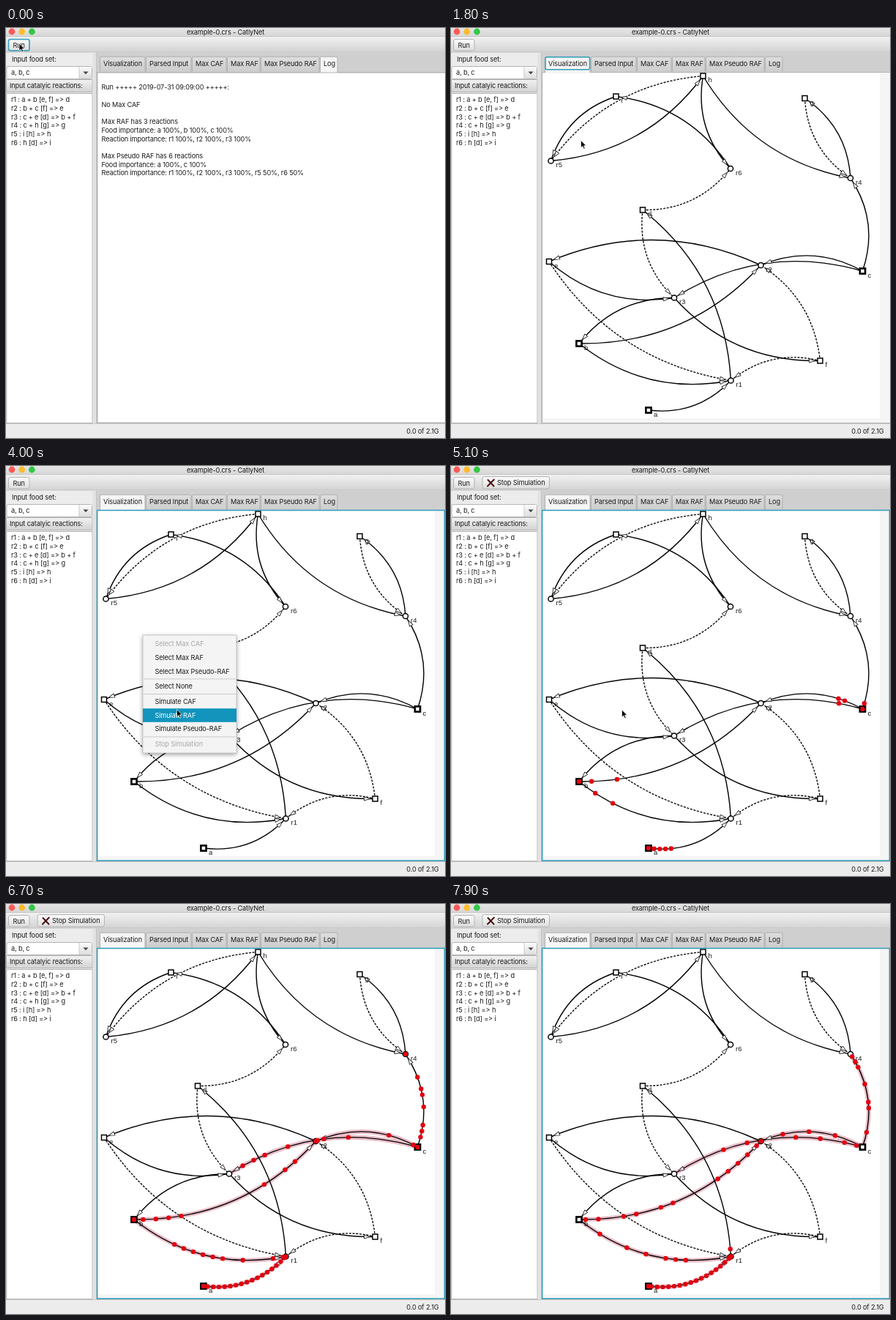
These frames come from a looping animation (600x560 px, 8 s). An HTML page:

```html
<!DOCTYPE html>
<html lang="en">
<head>
<meta charset="utf-8">
<title>Reaction network</title>
<style>
  html, body { margin: 0; width: 100%; height: 100%; overflow: hidden; background: #ececec; }
  svg { display: block; width: 600px; height: 560px; }
  text {
    font: 9.2px Inter, "Open Sans", sans-serif;
    letter-spacing: -.15px;
    font-feature-settings: "calt" 0, "liga" 0;
    fill: #1c1c1c;
    white-space: pre;
  }
  .node { font: 9.5px "Liberation Sans", Arial, sans-serif; letter-spacing: 0; }
  .edge { fill: none; stroke: #000; stroke-width: 1.4; }
  .dash { stroke-width: 1.35; stroke-dasharray: 3 1.7; }
  .glow { fill: none; stroke: #ebbfc9; stroke-width: 6; stroke-linecap: round; }
  .tip { fill: #fff; stroke: #222; stroke-width: .9; }
  .ring { fill: none; stroke: #2f9fbc; stroke-width: 1.5; }
  .off { fill: #a9a9a9; }
</style>
</head>
<body>
<svg id="stage" viewBox="0 0 600 560">
  <defs>
    <linearGradient id="title" x2="0" y2="1"><stop stop-color="#e6e6e6"/><stop offset="1" stop-color="#d6d6d6"/></linearGradient>
    <linearGradient id="bar" x2="0" y2="1"><stop stop-color="#f2f2f2"/><stop offset="1" stop-color="#d3d3d3"/></linearGradient>
    <linearGradient id="btn" x2="0" y2="1"><stop stop-color="#fbfbfb"/><stop offset="1" stop-color="#dedede"/></linearGradient>
    <linearGradient id="tab" x2="0" y2="1"><stop stop-color="#dedede"/><stop offset="1" stop-color="#cdcdcd"/></linearGradient>
    <filter id="shadow" x="-20%" y="-20%" width="140%" height="140%">
      <feDropShadow dx="0" dy="2" stdDeviation="3" flood-opacity=".4"/>
    </filter>
  </defs>
  <g id="chrome"></g>
  <g id="tabs"></g>
  <g id="log"></g>
  <g id="graph"></g>
  <rect id="paneRing" class="ring" x="124.6" y="60.5" width="474.8" height="478.5"/>
  <g id="menu"></g>
  <path id="cursor" d="M0 0V10L2.4 7.9L4 11.6L5.7 10.9L4.1 7.3H7.2Z" fill="#000" stroke="#fff" stroke-width=".7"/>
</svg>
<script>
const LOOP = 8000, FRAME = 100;
const $ = id => document.getElementById(id);
const rect = (x, y, w, h, fill, more = '') =>
  `<rect x="${x}" y="${y}" width="${w}" height="${h}" fill="${fill}" ${more}/>`;
const text = (x, y, s, more = '') =>
  `<text x="${x}" y="${y}" ${more}>${s.replace(/>/g, '&gt;')}</text>`;
const lines = (x, y, list) => list.map((s, i) => text(x, y + i * 11.7, s)).join('');
const show = (el, on) => { el.style.display = on ? '' : 'none'; };

// Window
const EDGE = 'stroke="#b4b4b4"';
$('chrome').innerHTML =
  rect(0, 0, 600, 560, '#ececec') +
  rect(0, 0, 600, 11.5, 'url(#title)') +
  ['#fc5b57', '#fdbc2e', '#33c748'].map((c, i) => `<circle cx="${8 + i * 13.7}" cy="5" r="4.4" fill="${c}"/>`).join('') +
  text(300, 8.5, 'example-0.crs - CatlyNet', 'text-anchor="middle"') +
  rect(0, 11.5, 600, 21.5, 'url(#bar)') +
  rect(0, 11, 600, .8, '#bdbdbd') + rect(0, 32.6, 600, .8, '#b8b8b8') +
  rect(3.5, 15.5, 28.5, 15.5, 'url(#btn)', EDGE + ' rx="2.5"') +
  '<rect id="runRing" class="ring" x="3.5" y="15.5" width="28.5" height="15.5" rx="2.5"/>' +
  text(9.5, 26.8, 'Run') +
  '<g id="stop">' + rect(43, 14.5, 91.5, 16.5, 'url(#btn)', EDGE + ' rx="2.5"') +
  '<path d="M50.5 19L58.5 27.5M58.8 18.5L50 27.5" stroke="#4a1014" stroke-width="2" stroke-linecap="round"/>' +
  text(63, 26.3, 'Stop Simulation') + '</g>' +
  text(8, 46, 'Input food set:') +
  rect(1, 52.5, 116.5, 17, '#fff', EDGE + ' rx="2"') +
  rect(100, 53, 17, 16, 'url(#btn)') + rect(99.6, 53, .8, 16, '#c0c0c0') +
  '<path d="M105.5 59.5h7l-3.5 3.8z" fill="#444"/>' +
  text(7, 64, 'a, b, c') +
  rect(.5, 70.5, 117.5, 17, 'url(#bar)', EDGE) +
  text(5, 81.8, 'Input catalyic reactions:') +
  rect(.8, 89.5, 117.2, 450, '#fff', EDGE) +
  lines(7, 101.3, ['r1 : a + b [e, f] => d', 'r2 : b + c [f] => e', 'r3 : c + e [d] => b + f',
    'r4 : c + h [g] => g', 'r5 : i [h] => h', 'r6 : h [d] => i']) +
  rect(118.6, 33.4, 5.4, 507, '#e2e2e2') + rect(123.4, 33.4, .9, 507, '#b0b0b0') +
  rect(124, 33.4, 476, 27, '#cfcfcf') +
  rect(124.5, 60.5, 477, 479, '#f5f5f5', EDGE) +
  rect(0, 540.2, 600, .8, '#bfbfbf') +
  text(591.5, 554.3, '0.0 of 2.1G', 'text-anchor="end"');

// Tabs: name, left, width
const TABS = [['Visualization', 128, 62], ['Parsed Input', 191, 62], ['Max CAF', 254, 47],
  ['Max RAF', 302, 45], ['Max Pseudo RAF', 348, 80], ['Log', 429, 24]];
function drawTabs(sel, focus) {
  $('tabs').innerHTML = TABS.map(([name, x, w], i) => {
    const on = i === sel;
    return `<path d="M${x + .5} ${on ? 61 : 59.5}V41q0-1.8 1.8-1.8H${x + w - 1.8}q1.8 0 1.8 1.8V${on ? 61 : 59.5}"` +
      ` fill="${on ? '#f5f5f5' : 'url(#tab)'}" stroke="#b0b0b0"/>` +
      (on && focus ? `<rect class="ring" x="${x + 1}" y="39.8" width="${w - 1.5}" height="17" rx="2"/>` : '') +
      text(x + 5, 51.5, name);
  }).join('');
}

$('log').innerHTML = rect(125, 61, 476, 478, '#fff', EDGE) + lines(130.5, 84.3, [
  'Run +++++ 2019-07-31 09:09:00 +++++:', '', 'No Max CAF', '', 'Max RAF has 3 reactions',
  'Food importance: a 100%, b 100%, c 100%', 'Reaction importance: r1 100%, r2 100%, r3 100%', '',
  'Max Pseudo RAF has 6 reactions', 'Food importance: a 100%, c 100%',
  'Reaction importance: r1 100%, r2 100%, r3 100%, r5 50%, r6 50%']);

// Network
const NODES = {
  a: [270, 522], b: [175, 431], c: [562.5, 332], d: [262, 248.5], e: [134, 319], f: [504.5, 454.5],
  g: [483.5, 96], h: [344.5, 65.5], i: [225.5, 93.5],
  r1: [382.5, 481.5], r2: [423.5, 324], r3: [305, 368.5], r4: [546, 205], r5: [136.5, 181.5], r6: [382, 192]
};
const SOLID = 'i-r5 r5-h r6-i h-r6 h-r4 r4-g r1-d r2-e e-r3 c-r2 c-r3 c-r4 b-r2 b-r1 r3-b r3-f a-r1'.split(' ');
const DASHED = 'h-r5 g-r4 d-r6 d-r3 e-r1 f-r2 f-r1'.split(' ');
const EDGES = [...SOLID, ...DASHED];

// Ticks at which a molecule leaves along each edge
const SENT = {
  'a-r1': [...Array(34).keys()],
  'b-r1': [0, 2, 4, 5, 8, 10, 11, 12, 13, 14, 15, 20, 21, 22, 24, 26, 29],
  'b-r2': [1, 3, 6, 7, 9, 16, 17, 18, 19, 20, 24, 25, 27, 28, 30, 31],
  'c-r2': [0, 1, 4, 15, 19, 23, 27],
  'c-r3': [2, 5, 6, 7, 9, 12, 14, 20, 22, 26, 28, 30, 31],
  'c-r4': [3, 8, 10, 11, 13, 16, 17, 18, 21, 24, 25, 29],
  'r1-d': [30.9]
};
const TICK = 101.7, START = 4695, TRIP = 16, REST = 1.3;

// Every edge bows to the right of its direction of travel
function curve(id) {
  const [[x1, y1], [x2, y2]] = id.split('-').map(n => NODES[n]);
  const dx = x2 - x1, dy = y2 - y1, len = Math.hypot(dx, dy);
  const bow = 2 * (.1 * len + 3) / len;
  return `M${x1} ${y1}Q${(x1 + x2) / 2 - dy * bow} ${(y1 + y2) / 2 + dx * bow} ${x2} ${y2}`;
}
const nodeShape = ([name, [x, y]]) => {
  const food = 'abc'.includes(name), s = food ? 3.6 : 3.5;
  const paint = `fill="#fff" stroke="#000" stroke-width="${food ? 2.6 : 1.5}"`;
  return name[1] ? `<circle cx="${x}" cy="${y}" r="3.6" ${paint}/>`
    : `<rect x="${x - s}" y="${y - s}" width="${2 * s}" height="${2 * s}" ${paint}/>`;
};
$('graph').innerHTML = rect(126, 62, 460, 471, '#fff') + '<g id="glows"></g>' +
  EDGES.map(id => `<path id="${id}" class="edge${DASHED.includes(id) ? ' dash' : ''}" d="${curve(id)}"/>`).join('') +
  '<g id="tips"></g>' +
  Object.entries(NODES).map(n => text(n[1][0] + 7, n[1][1] + 8.6, n[0], 'class="node"') + nodeShape(n)).join('') +
  '<g id="dots"></g>';

$('tips').innerHTML = EDGES.map(id => {
  const p = $(id), len = p.getTotalLength();
  const A = p.getPointAtLength(len - 7), B = p.getPointAtLength(len - 15);
  const turn = Math.atan2(A.y - B.y, A.x - B.x) * 180 / Math.PI;
  return `<path class="tip" d="M0 0L-8 -2.6V2.6Z" transform="translate(${A.x} ${A.y}) rotate(${turn})"/>`;
}).join('');

const flows = Object.entries(SENT).map(([id, ticks]) => {
  const path = $(id), glow = path.cloneNode();
  glow.removeAttribute('id');
  glow.setAttribute('class', 'glow');
  $('glows').append(glow);
  return { path, glow, ticks, len: path.getTotalLength() };
});

function drawDots(now) {
  let out = '';
  for (const { path, glow, ticks, len } of flows) {
    show(glow, now >= ticks[0] + TRIP + REST);
    for (const k of ticks) {
      const s = now - k;
      if (s < -.5 || s > TRIP + REST) continue;
      const p = path.getPointAtLength(len * Math.min(1, Math.max(0, s / TRIP)));
      out += `<circle cx="${p.x.toFixed(2)}" cy="${p.y.toFixed(2)}" r="3.2" fill="#e2000f"/>`;
    }
  }
  $('dots').innerHTML = out;
}

// Context menu: label, middle line, disabled
const ITEMS = [['Select Max CAF', 243, 1], ['Select Max RAF', 262], ['Select Max Pseudo-RAF', 280.5],
  ['Select None', 301], ['Simulate CAF', 321.5], ['Simulate RAF', 340.5], ['Simulate Pseudo-RAF', 359],
  ['Stop Simulation', 380, 1]];
function drawMenu(y) {
  $('menu').innerHTML = rect(187, 231, 128, 161, '#f4f4f4', 'filter="url(#shadow)"') +
    rect(187, 231, 128, 161, 'none', 'stroke="#bdbdbd" stroke-width=".8"') +
    [290.5, 311, 369.5].map(l => rect(188, l, 126, .9, '#c6c6c6')).join('') +
    ITEMS.map(([s, m, off]) => {
      const hot = !off && Math.abs(y - m) <= 9.3;
      return (hot ? rect(187, m - 9.3, 128, 18.6, '#1294bd') : '') +
        text(203.5, m + 3.3, s, off ? 'class="off"' : hot ? 'style="fill:#fff"' : '');
    }).join('');
}

// Pointer: time, x, y
const MOVES = [[0, 18, 21], [600, 18, 21], [1200, 150, 45], [1400, 153, 47], [1800, 177.5, 153.5],
  [2200, 187, 231], [3100, 187, 231], [3700, 233.5, 332.5], [5100, 233.5, 333], [5900, 228.5, 340.5], [LOOP, 228.5, 340.5]];
function pointer(t) {
  const i = MOVES.findIndex(m => m[0] > t), [t0, x0, y0] = MOVES[i - 1], [t1, x1, y1] = MOVES[i];
  const u = (t - t0) / (t1 - t0), k = u * u * (3 - 2 * u);
  return [x0 + (x1 - x0) * k, y0 + (y1 - y0) * k];
}

const TAB_CLICK = 1200, MENU_OPEN = 3200, MENU_PICK = 4200, HIDE = 6300;
function draw(t) {
  const graph = t >= TAB_CLICK, [x, y] = pointer(t);
  drawTabs(graph ? 0 : 5, graph && t < MENU_OPEN);
  show($('log'), !graph);
  show($('graph'), graph);
  show($('runRing'), !graph);
  show($('paneRing'), t >= MENU_OPEN);
  show($('stop'), t >= MENU_PICK + 200);
  const fade = 1 - Math.max(0, t - MENU_PICK) / 300;
  const open = t >= MENU_OPEN && fade > 0;
  show($('menu'), open);
  if (open) { drawMenu(y); $('menu').style.opacity = Math.min(1, fade); }
  drawDots((t - START) / TICK);
  show($('cursor'), t < HIDE);
  $('cursor').setAttribute('transform', `translate(${x} ${y})`);
}

const begin = performance.now();
let last = -1;
function loop() {
  const t = Math.floor((performance.now() - begin) % LOOP / FRAME) * FRAME;
  if (t !== last) draw(last = t);
  requestAnimationFrame(loop);
}
loop();
</script>
</body>
</html>
```
